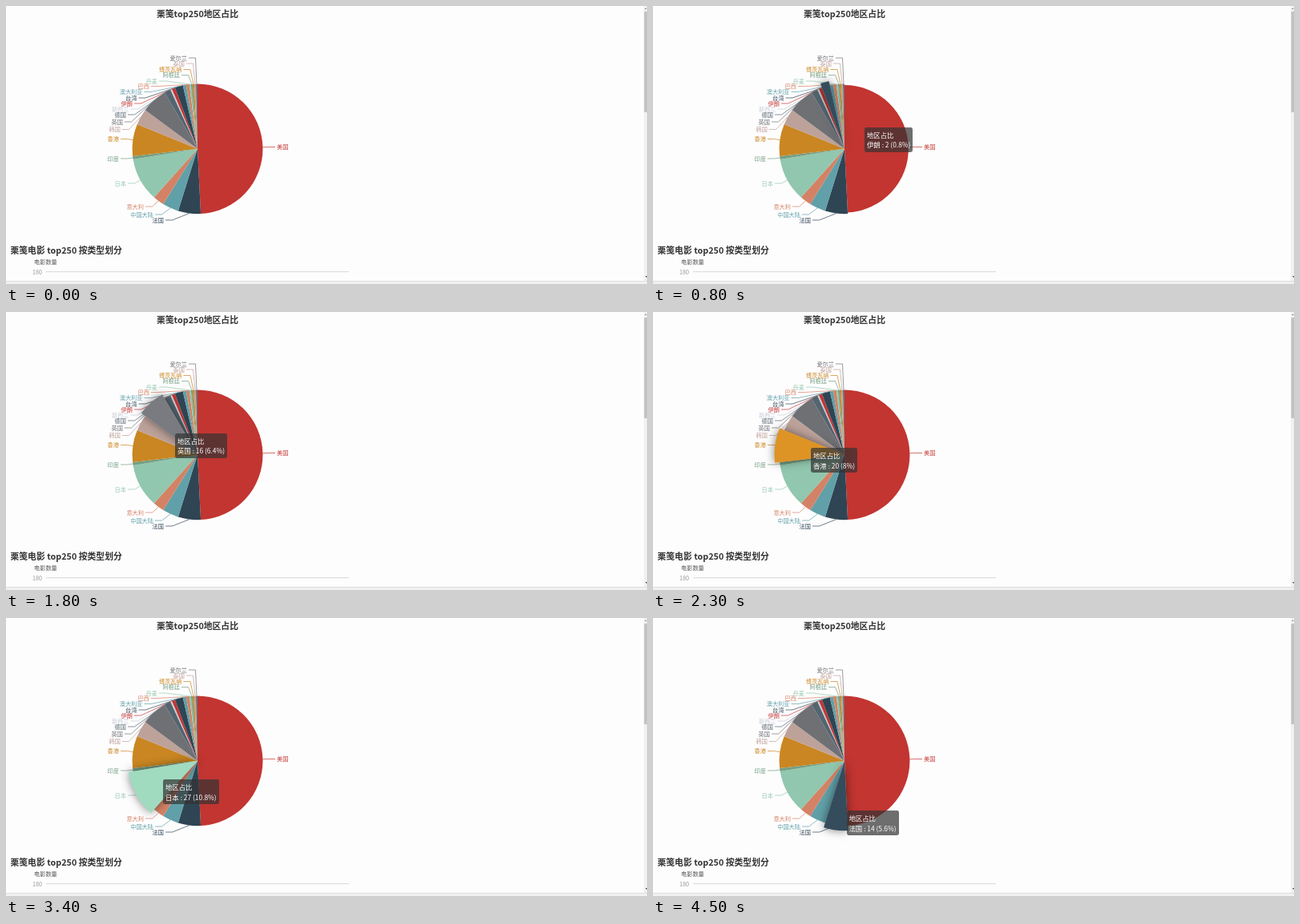
Write an HTML page that moves like this. It is 800 px wide and 348 px high and loops after 4600 ms.

```html
<!DOCTYPE html>
<html lang="zh-CN">
<head>
<meta charset="utf-8">
<title>地区占比</title>
<style>
  html, body { margin: 0; width: 100%; height: 100%; overflow: hidden; background: #fefdfe; }
  body, text { font-family: "Noto Sans CJK SC", "Noto Sans CJK", "Noto Sans", sans-serif; }
  svg { position: absolute; left: 0; top: 0; display: block; }
  text { font-size: 7.2px; }
  .title { font-size: 10.8px; font-weight: bold; fill: #333; }
  .leader { fill: none; stroke-width: .7; }
  .lit { filter: drop-shadow(0 0 6px rgba(0, 0, 0, .5)); }
  #tip {
    position: absolute; left: 0; top: 0; padding: 3px; border-radius: 2.4px;
    background: rgba(50, 50, 50, .7); color: #fff;
    font-size: 8.4px; line-height: 12.6px; white-space: nowrap;
  }
</style>
</head>
<body>
<svg width="800" height="348" viewBox="0 0 800 348">
  <text class="title" x="188" y="14">栗笺top250地区占比</text>
  <text class="title" x="5.5" y="310">栗笺电影 top250 按类型划分</text>
  <text x="35" y="323" fill="#555">电影数量</text>
  <text x="45" y="335.6" text-anchor="end" fill="#999">180</text>
  <path d="M50 332.7H428" stroke="#ccc" stroke-width=".8"/>
  <g id="labels"></g>
  <g id="pie"></g>
  <rect x="796" width="4" height="348" fill="#f1f1f1"/>
  <rect x="796.5" y="7" width="3.5" height="126" fill="#c1c1c1"/>
  <path d="M797 4l1.3-1.5L799.6 4z" fill="#777"/>
  <path d="M798 338h2v1.5h-1z" fill="#444"/>
  <rect y="344" width="800" height="4" fill="#f1f1f1"/>
  <path d="M0 344.5H800" stroke="#dedede"/>
</svg>
<div id="tip"></div>
<script>
const LOOP = 4600, STEP = 100, CX = 239, CY = 178.8, R = 81.4, POP = 6;
const TOTAL = 250, POP_MS = 300;
const palette = ['c23531', '2f4554', '61a0a8', 'd48265', '91c7ae', '749f83',
  'ca8622', 'bda29a', '6e7074', '546570', 'c4ccd3'];

// name, count, label edge x, label centre y
const regions = [
  ['美国', 123, 338, 176.5], ['法国', 14, 197, 268], ['中国大陆', 10, 184, 261],
  ['意大利', 7, 172, 251], ['日本', 27, 150, 222], ['印度', 2, 141, 191],
  ['香港', 20, 141, 166.5], ['韩国', 10, 143, 154.5], ['英国', 16, 146, 145],
  ['德国', 4, 150, 136], ['新西兰', 1, 153.5, 129], ['伊朗', 2, 158, 122],
  ['台湾', 5, 163.5, 115], ['澳大利亚', 2, 170.5, 107.5], ['巴西', 2, 179, 100.5],
  ['丹麦', 1, 189, 94], ['阿根廷', 1, 217, 86.5], ['博茨瓦纳', 1, 219.5, 79.5],
  ['泰国', 1, 223, 72], ['爱尔兰', 1, 226, 65]
];

// region, pointer enters, pointer leaves
const hovers = [
  ['美国', 570, 750], ['台湾', 700, 860], ['英国', 880, 1930], ['韩国', 1930, 2130],
  ['香港', 2130, 3180], ['日本', 3180, 4000], ['意大利', 4010, 4100],
  ['中国大陆', 4100, 4190], ['法国', 4200, LOOP]
];

// time, x, y, region
const tipStops = [
  [600, 297, 160, '美国'], [700, 288, 156, '美国'], [800, 264, 151.5, '伊朗'],
  [900, 236, 154, '德国'], [1000, 222, 162, '英国'], [1100, 214, 166, '英国'],
  [1200, 211.5, 148.5, '英国'], [1700, 211.5, 148.5, '英国'], [1800, 211, 151.5, '英国'],
  [1900, 214, 160, '英国'], [2000, 212, 174, '韩国'], [2100, 206, 184, '韩国'],
  [2200, 200, 178, '香港'], [2300, 197, 170, '香港'], [2500, 196, 188, '香港'],
  [2700, 196, 197, '香港'], [3100, 196, 197, '香港'], [3200, 196, 199, '日本'],
  [3400, 196, 202, '日本'], [3700, 196, 202, '日本'], [3900, 199.5, 213, '日本'],
  [4100, 214, 230, '意大利'], [4200, 222, 235, '中国大陆'], [4300, 229, 238, '中国大陆'],
  [4400, 238, 240, '法国'], [4500, 241.5, 241, '法国']
];

const $ = id => document.getElementById(id);
const point = (turn, r) => [
  CX + r * Math.sin(turn * 2 * Math.PI),
  CY - r * Math.cos(turn * 2 * Math.PI)
].map(v => v.toFixed(2));

let sum = 0;
const slices = regions.map(([name, count, x, y], i) => {
  const from = sum / TOTAL;
  sum += count;
  const hex = i === 0 ? palette[0] : palette[i % palette.length];
  const rgb = hex.match(/../g).map(h => parseInt(h, 16));
  return { name, count, x, y, from, to: sum / TOTAL, color: '#' + hex,
    bright: `rgb(${rgb.map(v => Math.round(v * 1.1))})` };
});

$('labels').innerHTML = slices.map(({ name, x, y, from, to, color }) => {
  const side = x > CX ? -1 : 1;
  const edge = point((from + to) / 2, R);
  return `<path class="leader" stroke="${color}" d="M${x + 2 * side} ${y}H${x + 10.5 * side}L${edge}"/>
    <text x="${x}" y="${y + 2.7}" fill="${color}" text-anchor="${side > 0 ? 'end' : 'start'}">${name}</text>`;
}).join('');

function elasticOut(k) {
  if (k <= 0) return 0;
  if (k >= 1) return 1;
  return 1 + 2 ** (-10 * k) * Math.sin((k - .1) * 2 * Math.PI / .4);
}

function slicePath({ from, to }, r) {
  return `M${CX} ${CY}L${point(from, r)}A${r} ${r} 0 ${to - from > .5 ? 1 : 0} 1 ${point(to, r)}Z`;
}

function drawPie(t) {
  const resting = [], lit = [];
  for (const s of slices) {
    const [, on, off] = hovers.find(h => h[0] === s.name) || [s.name, LOOP, LOOP];
    const active = t >= on && t < off;
    const lift = elasticOut((t - on) / POP_MS) - elasticOut((t - off) / POP_MS);
    const path = `<path d="${slicePath(s, R + POP * lift)}" fill="${active ? s.bright : s.color}"`;
    (active ? lit : resting).push(path + (active ? ' class="lit"/>' : '/>'));
  }
  $('pie').innerHTML = resting.concat(lit).join('');
}

function drawTip(t) {
  const tip = $('tip');
  const i = tipStops.findLastIndex(stop => stop[0] <= t);
  tip.style.display = i < 0 ? 'none' : 'block';
  if (i < 0) return;
  const [t0, x0, y0, name] = tipStops[i];
  const [t1, x1, y1] = tipStops[i + 1] || [LOOP, x0, y0];
  const k = (t - t0) / (t1 - t0);
  const { count } = slices.find(s => s.name === name);
  tip.style.left = x0 + (x1 - x0) * k + 'px';
  tip.style.top = y0 + (y1 - y0) * k + 'px';
  tip.innerHTML = `地区占比<br>${name} : ${count} (${+(count / TOTAL * 100).toFixed(1)}%)`;
}

// The screen refreshes in steps of a tenth of a second.
let shown = -1;
const start = performance.now();
function render() {
  const t = Math.floor((performance.now() - start) % LOOP / STEP) * STEP;
  if (t !== shown) {
    shown = t;
    drawPie(t);
    drawTip(t);
  }
  requestAnimationFrame(render);
}
render();
</script>
</body>
</html>
```
